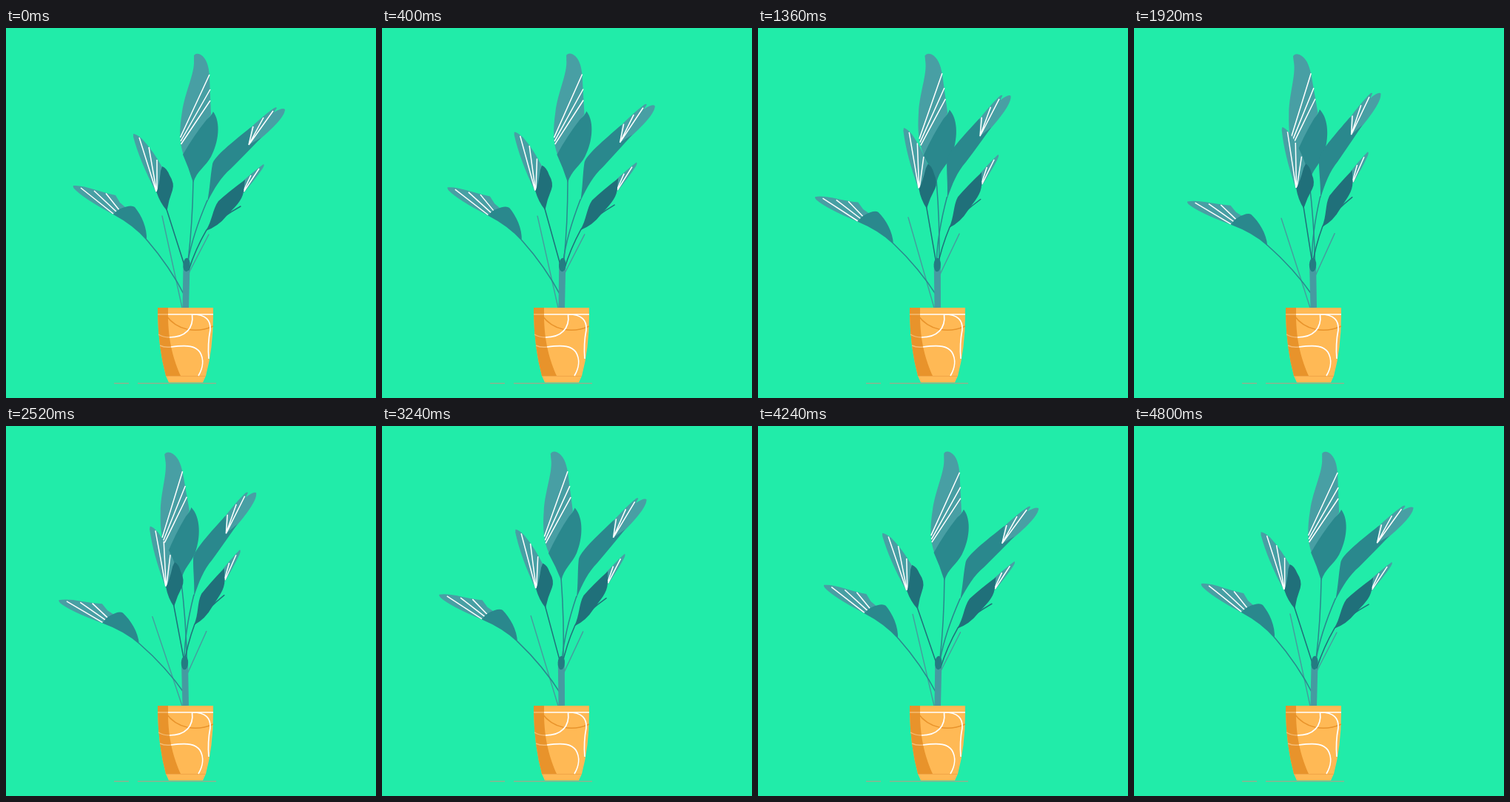
An HTML page for the animation above (4.84 s loop, 500x500 px).

```html
<!DOCTYPE html>
<html lang="en">
<head>
<meta charset="utf-8">
<title>Swaying plant</title>
<style>
html, body { margin: 0; width: 100%; height: 100%; overflow: hidden; background: #21eca9; }
svg { display: block; width: 100vw; height: 100vh; }
.light { fill: #489fa4; }
.mid { fill: #2a888d; }
.dark { fill: #20707a; }
.stem, .vein { fill: none; stroke-linecap: round; }
.stem { stroke: #2a888d; stroke-width: 1.5; }
.deep { stroke: #20707a; }
.thin { stroke: #469b9e; stroke-width: 1.4; }
.vein { stroke: #fff; stroke-width: 1.5; stroke-linecap: butt; }
.shade { fill: #e8932b; }
.pot { fill: #ffb955; }
</style>
</head>
<body>
<svg viewBox="0 0 500 500">
  <path d="M146 480.200H166M178 480.200H284" stroke="#8cb48f" stroke-width="1.500"/>

  <g id="twigLeft"><path class="stem thin" d="M211 254L238 378"/></g>
  <g id="twigRight"><path class="stem thin" d="M274 279L245 335"/></g>

  <g id="leftLeaf">
    <path class="stem" d="M190 286Q222 323 242 363"/>
    <path class="light" d="M91 213Q101 212 122 219Q138 224 148 226L154 236L161 242L145 252Q104 230 92 217Q90 214 91 213Z"/>
    <path class="vein" d="M101 216L145 251M119 220L150 249M135 223.500L153 246"/>
    <path class="mid" d="M145 252Q150 246 155 244Q169 238 174 242C183 253 191 270 190 287Q173 267 145 252Z"/>
  </g>

  <g id="trunk">
    <path fill="#469aa1" d="M238.500 378L239.500 322H248.500L247 378Z"/>
  </g>

  <g id="topLeaf">
    <path class="stem" d="M253 207Q252 265 246 315"/>
    <path class="light" d="M254 37Q257 33 263 36C271 41 274 51 275 65L277 117L240 172C234 154 234 138 238 113C242 86 255 62 254 44Z"/>
    <path class="vein" d="M235.500 148L275 63M236 153L276 83M236.500 157L276 98"/>
    <path class="mid" d="M280 113C291 128 287 155 277 174C270 187 258 193 253 209Q247 189 239 171Q254 145 271 124Q278 118 280 113Z"/>
  </g>

  <g id="upperRightLeaf">
    <path class="stem" d="M272 233Q252 280 246 315"/>
    <path class="light" d="M327 138Q347 119 361 109Q365 106 366 108L362 114Q374 107 377 110Q377 118 361 134Q346 149 328 162Z"/>
    <path class="mid" d="M272 235C276 215 276 200 279 184C281 174 305 155 331 134L328 158L345 148Q326 168 304 190C290 202 282 216 272 235Z"/>
    <path class="vein" d="M328 158L334 133M328 158L348 121M328 158L361 112"/>
  </g>

  <g id="lowerRightLeaf">
    <path class="stem deep" d="M317 241Q292 255 271 273Q256 299 247 327"/>
    <path class="light" d="M321 206Q337 192 348 184Q350 185 346 191Q337 204 321 223Z"/>
    <path class="vein" d="M321.500 219L331 199M321.500 221L342 190"/>
    <path class="dark" d="M270 274C279 260 279 245 287 234Q300 222 323 205L321 221C319 234 309 242 298 254Q287 268 270 274Z"/>
  </g>

  <g id="innerLeaf">
    <path class="stem deep" d="M217 245L242.500 325"/>
    <path class="light" d="M172 143Q176 143 184 150Q199 166 211 188L206 222H203Q181 181 172 147Z"/>
    <path class="vein" d="M180 148L203 221M193 161L203.500 221M204 178V221"/>
    <path class="dark" d="M211 187Q217 189 221 199Q228 210 225 219Q220 232 217.500 247Q208 236 203.500 222Q207 213 209 193Z"/>
  </g>

  <g id="knot"><ellipse cx="244" cy="320" rx="4.700" ry="9.300" fill="#247b82" transform="rotate(4 244 320)"/></g>

  <path class="pot" d="M205 378H280V388Q280 433 270 470L266 479H220L216 470Q206 433 205 388Z"/>
  <path class="shade" d="M205 378H219V388C219 424 227 450 236 470H216Q206 433 205 388Z"/>
  <path fill="none" stroke="#e8932b" stroke-width="1.400" d="M216 388C231 409 257 413 280 403"/>
  <path fill="none" stroke="#f0a548" d="M216 470.500H270"/>
  <path fill="none" stroke="#f5bd75" stroke-width="1.400" d="M205 387H219M206 414Q212 418 221 418M208 429Q214 432 223 431"/>
  <path class="vein" style="stroke-width:1.700" d="M219 387H280M221 418C242 418 254 406 251.500 387M252 387C270 387 277 395 276 408C273 423 273 435 274 447M223 431C247 428 256 430 262 438C268 448 266 460 260 470"/>
</svg>
<script>
const LOOP = 4840;

// id: [pivot x, pivot y, swing in degrees, phase lead in ms]
const sways = {
  twigLeft: [238, 378, 3.1, 0],
  twigRight: [245, 335, 1.6, 0],
  leftLeaf: [240, 362, 4.15, 130],
  trunk: [242, 378, 1.3, 130],
  topLeaf: [244, 327, 4.1, 165],
  upperRightLeaf: [233, 345, 5.45, 400],
  lowerRightLeaf: [233, 366, 5.1, 200],
  innerLeaf: [244, 322, -5.05, 560],
  knot: [242, 378, 1.3, 130]
};

const wave = ms => Math.cos(2 * Math.PI * ms / LOOP);
const start = performance.now();

function draw(now) {
  const t = Math.max(0, now - start) % LOOP;
  for (const [id, [x, y, swing, lead]] of Object.entries(sways)) {
    const angle = swing * (wave(t + lead) - wave(lead));
    document.getElementById(id).setAttribute("transform", `rotate(${angle} ${x} ${y})`);
  }
  requestAnimationFrame(draw);
}
draw(start);
</script>
</body>
</html>
```
